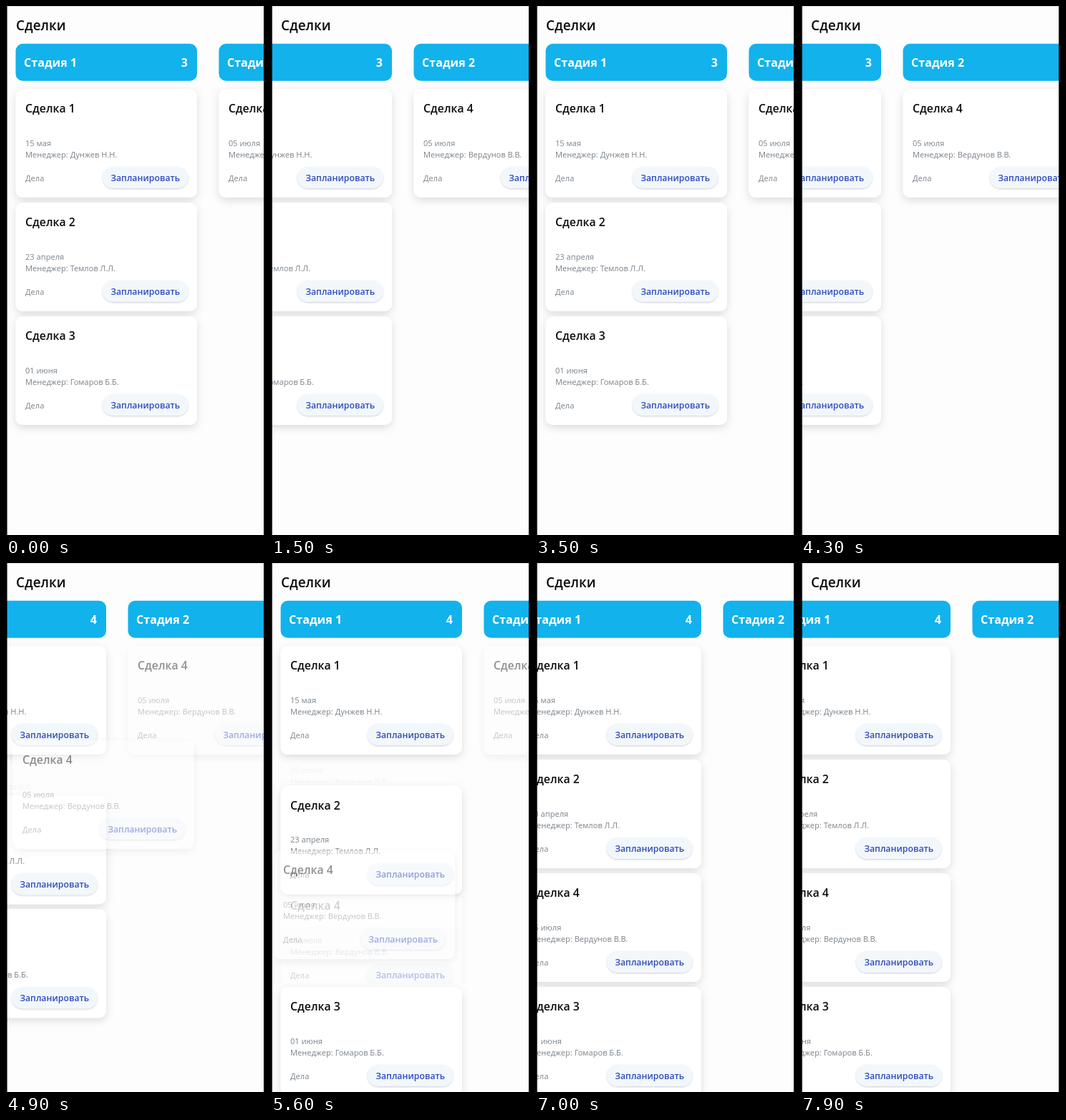
An HTML page for the animation above (8000 ms loop, 362 by 740 pixels).

```html
<!DOCTYPE html>
<html lang="ru">
<head>
<meta charset="utf-8">
<style>
  html, body { margin: 0; width: 100%; height: 100%; overflow: hidden; background: #fdfdfd; }
  svg { display: block; width: 362px; height: 740px; font-family: "Open Sans", "Noto Sans", sans-serif; }
  .page { font-size: 18.9px; font-weight: 600; fill: #0c0c0e; }
  .stage { font-size: 16.1px; font-weight: 700; fill: #fff; }
  .name { font-size: 15.8px; font-weight: 600; fill: #0c0c0e; }
  .info { font-size: 11.1px; fill: #7b838b; }
  .plan { font-size: 12.3px; font-weight: 600; fill: #2f4bbd; text-anchor: middle; }
</style>
</head>
<body>
<svg viewBox="0 0 362 740">
  <defs>
    <filter id="soft" x="-15%" y="-15%" width="130%" height="140%">
      <feDropShadow dx="0" dy="4" stdDeviation="6" flood-color="#000" flood-opacity=".13"/>
    </filter>
    <filter id="lift" x="-10%" y="-20%" width="120%" height="150%">
      <feDropShadow dx="0" dy="1" stdDeviation="1" flood-color="#2a3550" flood-opacity=".25"/>
    </filter>
    <clipPath id="clipA"><rect id="boxA" x="-10" width="300"/></clipPath>
    <clipPath id="clipB"><rect id="boxB" x="-10" width="300"/></clipPath>
  </defs>
  <rect width="362" height="740" fill="#fdfdfd"/>
  <rect width="362" height="1" fill="#dcdcdc"/>
  <text class="page" x="14" y="34.3">Сделки</text>
  <g id="board"></g>
  <g id="drag"></g>
  <rect width="1.6" height="740"/>
  <rect x="360.3" width="1.7" height="740"/>
</svg>
<script>
const LOOP = 8000, STEP = 100, PITCH = 159, COLUMN = 284, GHOST = 0.45;
const $ = id => document.getElementById(id);

const deals = [
  ['Сделка 1', '15 мая', 'Дунжев Н.Н.'],
  ['Сделка 2', '23 апреля', 'Темлов Л.Л.'],
  ['Сделка 3', '01 июня', 'Гомаров Б.Б.'],
  ['Сделка 4', '05 июля', 'Вердунов В.В.']
];

const card = ([name, date, manager]) => `
  <rect x="13.5" y="116" width="253.5" height="152" rx="10" fill="#fff" filter="url(#soft)"/>
  <text class="name" x="27" y="149.3">${name}</text>
  <text class="info" x="27" y="196">${date}</text>
  <text class="info" x="27" y="212">Менеджер: ${manager}</text>
  <text class="info" x="27" y="244.5">Дела</text>
  <rect x="135" y="225" width="119.5" height="30" rx="15" fill="#f2f7fc" filter="url(#lift)"/>
  <text class="plan" x="194.8" y="245">Запланировать</text>`;

const header = (n, id) => `
  <rect x="13.5" y="52.8" width="253.5" height="52" rx="10" fill="#12b2ec"/>
  <text class="stage" x="25" y="85.4">Стадия ${n}</text>
  <text class="stage" id="${id}" x="254" y="85.4" text-anchor="end"></text>`;

const group = (id, deal) => `<g id="${id}">${card(deals[deal])}</g>`;
const slot = k => `<g clip-path="url(#clip${k})">${group('ghost' + k, 3)}</g>`;

$('board').innerHTML =
  header(1, 'count1') + group('first', 0) + slot('A') + group('second', 1) + slot('B') + group('third', 2) +
  `<g transform="translate(${COLUMN} 0)">${header(2, 'count2')}${group('moved', 3)}</g>`;
$('drag').innerHTML = card(deals[3]);

// Scroll positions, one per step
const go = [36, 98, 155, 192, 206];
const back = [190, 153, 105, 58, 30, 14, 6, 2, 0];
const pull = [190, 165, 127, 85, 48, 20, 6, 0];
const swipes = [[1400, go], [2200, back], [4100, go], [4700, pull], [7000, go], [7600, back]];

function scrollAt(t) {
  const last = swipes.filter(([start]) => start <= t).pop();
  if (!last) return 0;
  const [start, list] = last;
  return list[Math.min((t - start) / STEP, list.length - 1)];
}

// Linear track through [time, value] pairs
function track(t, keys) {
  const i = keys.findIndex(([time]) => time > t);
  if (i === 0) return keys[0][1];
  if (i < 0) return keys[keys.length - 1][1];
  const [t0, v0] = keys[i - 1], [t1, v1] = keys[i];
  return v0 + (v1 - v0) * (t - t0) / (t1 - t0);
}

const place = (id, x, y) => $(id).setAttribute('transform', `translate(${x} ${y})`);
const fade = (id, v) => $(id).setAttribute('opacity', v);

// A gap that opens from its middle and reveals the waiting card
function openSlot(k, offset, part, alpha) {
  const size = PITCH * part;
  $('box' + k).setAttribute('y', 112 + offset);
  $('box' + k).setAttribute('height', part === 1 ? size + 30 : size);
  place('ghost' + k, 0, offset - (PITCH - size) / 2);
  fade('ghost' + k, alpha);
}

function draw(t) {
  const a = track(t, [[4800, 0], [4900, 0.316], [5000, 0.7], [5100, 1], [5400, 1], [5500, 0.6], [5600, 0.228], [5700, 0]]);
  const b = track(t, [[5400, 0], [5500, 0.4], [5600, 0.772], [5700, 1]]);
  const dragging = t >= 4600 && t < 5900, dropped = t >= 5900;

  place('board', -scrollAt(t), 0);
  openSlot('A', PITCH, a, GHOST * a);
  place('second', 0, PITCH * (1 + a));
  openSlot('B', PITCH * (2 + a), b, dropped ? 1 : GHOST * b);
  place('third', 0, PITCH * (2 + a + b));

  $('count1').textContent = a + b > 0 ? 4 : 3;
  $('count2').textContent = dropped ? 0 : 1;
  fade('moved', dropped ? 0 : dragging ? GHOST : 1);
  fade('drag', dragging ? GHOST : 0);
  place('drag',
    track(t, [[4600, 78], [4700, 60], [4800, 28], [4900, -4], [5100, -8], [5400, -10]]),
    track(t, [[4600, 0], [4700, 30], [4800, 90], [4900, 132], [5100, 160], [5400, 240], [5600, 286], [5800, 312]]));
}

const begin = performance.now();
function tick() {
  const t = (performance.now() - begin) % LOOP;
  draw(Math.floor(t / STEP) * STEP);
  requestAnimationFrame(tick);
}
tick();
</script>
</body>
</html>
```
